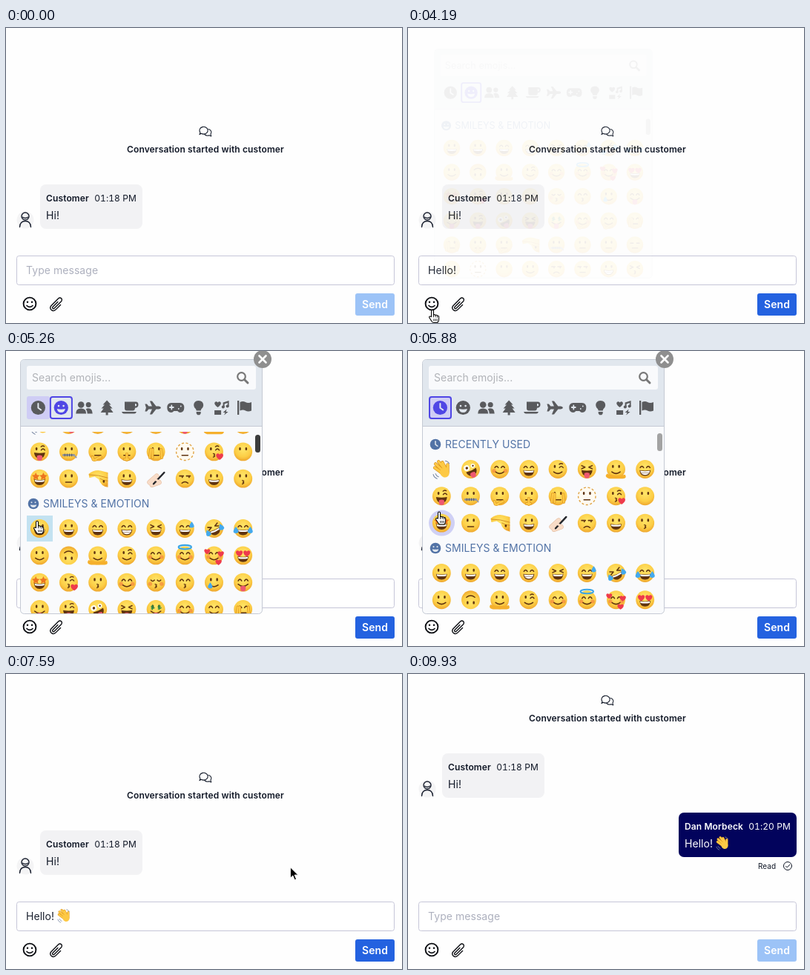
Recreate the animation shown at these times as an HTML page. Size 534 by 398 pixels, loop 9950 ms.

```html
<!DOCTYPE html>
<html lang="en">
<head>
<meta charset="utf-8">
<title>Chat with emoji picker</title>
<style>
html, body { margin: 0; width: 100%; height: 100%; overflow: hidden; background: #fefefe; }
#stage { display: block; width: 534px; height: 398px; font: 14px Inter, sans-serif; letter-spacing: .05px; }
.bold { font-weight: 600; letter-spacing: .12px; }
.small { font-size: 12px; }
.time { font-size: 12px; font-variant-numeric: tabular-nums; letter-spacing: .1px; }
.line { fill: none; stroke-linecap: round; stroke-linejoin: round; }
</style>
</head>
<body>
<svg id="stage" viewBox="0 0 534 398">
  <defs>
    <radialGradient id="skin" cx=".5" cy=".36" r=".66">
      <stop offset="0" stop-color="#ffe66a"/>
      <stop offset=".65" stop-color="#fccd45"/>
      <stop offset="1" stop-color="#eda32c"/>
    </radialGradient>
  </defs>

  <g id="chat" fill="#111827">
    <g class="line" stroke="#111827" stroke-width="1.1">
      <path d="M263 142.2q-1.4 1.5-2 1.5 .9-1.2 .8-2.9a5.6 4.9 0 1 1 4.6 2.3q-1.8 0-3.4-.9z"/>
      <path d="M273 136.500a4.800 4.300 0 0 1 3 6.700q.1 1.700 .8 2.700-1.500-.2-2.500-1.100a5.500 4.500 0 0 1-6.500-1.300"/>
    </g>
    <text class="bold small" x="269" y="168" text-anchor="middle">Conversation started with customer</text>
    <circle cx="26" cy="259" r="11.500" fill="#f4f4f5"/>
    <g class="line" stroke="#1b2130" stroke-width="1.400">
      <circle cx="26" cy="254" r="5"/>
      <path d="M22.500 255.200q3.500 2.600 7 0M18.500 268.500q.5-8 7.500-8t7.500 8"/>
    </g>
    <rect x="46" y="211" width="138" height="60" rx="8" fill="#f2f2f4"/>
    <text class="bold small" x="54" y="234">Customer</text>
    <text class="time" x="176" y="234" text-anchor="end">01:18 PM</text>
    <text x="54" y="258">Hi!</text>
    <g id="reply" fill="#fff">
      <rect x="365" y="291" width="159" height="60" rx="7" fill="#02035c"/>
      <text class="bold small" x="373" y="314">Dan Morbeck</text>
      <text class="time" x="516" y="314" text-anchor="end">01:20 PM</text>
      <text x="373" y="338">Hello!</text>
      <g id="replyWave" transform="translate(424 332) scale(.74)"></g>
    </g>
    <g id="read">
      <text x="472" y="367" font-size="10">Read</text>
      <g class="line" stroke="#111827">
        <circle cx="512" cy="363" r="5.500"/><path d="M509.500 363.200l1.800 1.800 3.400-3.700"/>
      </g>
    </g>
  </g>

  <rect id="ring" x="11" y="304" width="516" height="46" rx="6" fill="#4a8fe4"/>
  <rect id="field" x="14.500" y="307.500" width="509" height="39" rx="3" fill="#fff" stroke="#c6c6d8"/>
  <text id="hint" x="27" y="332" fill="#adb0be">Type message</text>
  <text id="typed" x="27" y="332" fill="#1c2230"></text>
  <g id="typedWave" transform="translate(78 326) scale(.74)"></g>
  <rect id="caret" y="318" width="1" height="18" fill="#000"/>

  <g class="line" stroke="#0b0d12">
    <circle cx="32" cy="372" r="8.400" stroke-width="1.900"/>
    <path d="M29 369.700v.1M35 369.700v.1" stroke-width="2.500"/>
    <path d="M28 374.500q4 3.800 8 0" stroke-width="1.700"/>
    <path transform="translate(57 362) scale(.9)" stroke-width="1.500" d="M18.400 12.700l-7.700 7.700a4.500 4.500 0 0 1-6.400-6.300l11-11a3 3 0 1 1 4.200 4.300L8.600 18.300a1.500 1.500 0 0 1-2.100-2.100l7.800-7.800"/>
  </g>
  <rect id="send" x="471" y="358" width="53" height="30" rx="3"/>
  <text class="bold" x="497.500" y="378" text-anchor="middle" fill="#fff">Send</text>

  <g id="picker">
    <rect x="19.500" y="11.500" width="326" height="343" rx="5" fill="#f9fafc" stroke="#c5cad4"/>
    <path d="M20 101V16q0-4 4-4H341q4 0 4 4V101z" fill="#e1e7ee"/>
    <path d="M20 101.500H345" stroke="#c5cad4"/>
    <rect x="28" y="20" width="309" height="32" rx="3" fill="#f9fafc"/>
    <text x="35" y="41" fill="#b1b3b8">Search emojis...</text>
    <g class="line" stroke="#777"><circle cx="317.500" cy="34.500" r="5.300" stroke-width="2.200"/><path d="M321.700 38.700l4.300 4.300" stroke-width="3"/></g>
    <g id="tabs"></g>
    <svg x="20" y="109" width="325" height="245" viewBox="20 109 325 245">
      <g id="list"><rect id="hover" width="35" height="35"/></g>
      <rect id="thumb" x="336" width="7" height="24" rx="3.500"/>
    </svg>
  </g>
  <g id="close">
    <circle cx="346" cy="11" r="12" fill="#8f8f8f"/>
    <path class="line" d="M341.500 6.500l9 9M350.500 6.500l-9 9" stroke="#fff" stroke-width="2.600"/>
  </g>
  <g id="pointer"></g>
</svg>

<script>
const LOOP = 9950, TICK = 89.46;
const BROWN = '#5f3310', HEADER = '#e1e7ee', ACCENT = '#4f46e5';
const $ = id => document.getElementById(id);
const set = (el, attrs) => { for (const k in attrs) el.setAttribute(k, attrs[k]); };
const show = (el, on) => el.setAttribute('visibility', on ? 'visible' : 'hidden');
const line = (d, w = 1.5, c = BROWN) => `<path class="line" d="${d}" stroke="${c}" stroke-width="${w}"/>`;
const fill = (d, c) => `<path d="${d}" fill="${c}"/>`;
const dot = (x, y, r, c) => `<circle cx="${x}" cy="${y}" r="${r}" fill="${c}"/>`;
const at = (x, y, body, s = 1) => `<g transform="translate(${x} ${y}) scale(${s})">${body}</g>`;

// Emoji: first letter eyes, second letter mouth, the rest extras
const HEART = 'M0 4C-8-1-3-6 0-2.500 3-6 8-1 0 4z';
const STAR = 'M0-4.800l1.400 3 3.300.4-2.400 2.300.6 3.200L0 2.500l-2.900 1.600.6-3.200-2.400-2.300 3.300-.4z';
const heart = (x, y, s) => at(x, y, fill(HEART, '#ee3b4c'), s);
const star = x => at(x, -2.8, fill(STAR, '#ec7420'), 1.1);
const drop = (x, y, s = 1) => at(x, y, fill('M0-4q6 7.500 0 8-6-.5 0-8z', '#43a9ee'), s);
const open = fill('M-7.300 1.200q7.300 1.600 14.600 0-.6 7.600-7.300 7.600t-7.300-7.600z', BROWN);
const teeth = fill('M-6.500 1.800q6.500 1.300 13 0l-.5 2.200q-6 1-12 0z', '#fff');
const tongue = fill('M-3.500 5.500q3.500-2 7 0v3q0 3.500-3.500 3.500t-3.500-3.500z', '#ee5870');
const hand = (d, w) => line(d, w + 1.2, '#d9901c') + line(d, w, '#fdc945');

const EYES = {
  o: line('M-4.100-4.500v1.600M4.100-4.500v1.600', 2.4),
  '^': line('M-6.500-2q2.300-4 4.600 0M1.900-2q2.300-4 4.600 0'),
  u: line('M-6.500-3q2.300 3 4.600 0M1.900-3q2.300 3 4.600 0'),
  x: line('M-7-4.800l4.500 2.100-4.500 2.100M7-4.800l-4.500 2.100 4.500 2.100'),
  w: line('M-4.100-4.500v1.600', 2.4) + line('M2-2q2.500-3.500 5 0M1.800-6.500q2.500-2 4.500-.5', 1.3),
  '-': line('M-6.500-2.500h4M2.500-2.500h4'),
  z: dot(-4.3, -3.5, 3.8, '#fff') + dot(-4, -3.5, 1.7, BROWN) + dot(4.6, -3, 2.7, '#fff') + dot(4.6, -3, 1.2, BROWN),
  r: line('M-7-3.500h5M2-3.500h5M-3.500-2v.3M5.500-2v.3', 1.7),
  s: star(-5) + star(5),
  h: heart(-5, -2.5, 1.05) + heart(5, -2.5, 1.05)
};
const MOUTHS = {
  s: line('M-5.500 3.500q5.500 4.500 11 0'),
  O: open + teeth,
  g: open + fill('M-6.300 2q6.300 1.400 12.600 0-.6 5.600-6.300 5.600t-6.300-5.600z', '#fff') + line('M-5.500 4.900h11', .5),
  f: line('M-4 4.800h8'),
  k: line('M-1 2.500q3.500.5 .8 2.300 2.700.8-.8 2.400', 1.3),
  t: open + tongue,
  l: line('M-6.500 2.500q6.500 5.500 13 0') + tongue,
  n: line('M-4 6q4-3.500 8 0'),
  z: line('M-7 4.500h14', 2.6, '#8b8f99') + line('M-5 3v3M-2 3v3M1 3v3M4 3v3', .8, '#555') + line('M7 4.500l3 3', 1.8, '#9a9da6'),
  _: ''
};
const EXTRAS = {
  b: '<g opacity=".45">' + dot(-7.5, 2, 2.6, '#f0603a') + dot(7.5, 2, 2.6, '#f0603a') + '</g>',
  a: '<ellipse cy="-11" rx="8.500" ry="2.700" fill="none" stroke="#3aa5e6" stroke-width="2"/>',
  c: drop(-5, 4),
  d: drop(9, -5),
  j: drop(-9.5, 2, 1.1) + drop(9.5, 2, 1.1),
  r: heart(7.5, 6.5, 1.1),
  R: heart(-9, -5, .9) + heart(9, -2, .95) + heart(6, 9, .95),
  h: hand('M-7 7l1 3.500q3 1.500 5-1.500l5-2', 2.6),
  q: hand('M0 3v8M-3 10h5', 2.6),
  p: hand('M-8 8l1-11M-4.500 8v-11M8 8l-1-11', 2.4),
  m: fill('M-12 6q4 2 12 2t12-1q3 5-3 5.500h-18q-7-2-3-6.500z', '#f5b02c'),
  M: line('M-4.500-5.500v6M4.500-5.500v6', 1, '#2c8a45') + line('M-3-4q-3-1-3 .8t3 1.300-3 1.600M6-4q-3-1-3 .8t3 1.300-3 1.600', 1.2, '#2c8a45')
};
const WHOLE = {
  wave: hand('M2 6L-9-2M3 3L-8-7M5 1L-4-10M6 1L1-9M8 4L8-6', 3.1) +
    '<ellipse cx="4" cy="4.500" rx="6" ry="6.500" transform="rotate(-35 4 4.500)" fill="#fdc945"/>' +
    line('M-8 6q1 3 4 4M-11 7q1 4 5 5.500M5-11q3.500.5 5 3.500', 1.1, '#7c8aa5'),
  write: line('M-8 5L1-3M-5 8l9-3', 7, '#e6bfa3') + line('M-8 5L1-3M-5 8l9-3', 5.800, '#f8dcc8') +
    line('M-3 7L11-8', 2.4, '#24262b') + line('M-2 1l5 2', 3, '#f8dcc8'),
  salute: fill('M-12-6Q-5-12 4-10.500L13.500-8V11.500Q4 10 1.500 1L-4-2.500-11-1z', 'url(#skin)') +
    line('M-11-5L1-4 13-1M3 0q4 3 10 3', .9, '#d08a24') + line('M8 3v1.200', 2.4)
};

function emoji(code) {
  if (WHOLE[code]) return WHOLE[code];
  const extra = code.slice(2), has = c => extra.includes(c);
  const base = has('D')
    ? '<circle r="11.500" fill="#fffaf0" stroke="#e0a548" stroke-width="1.400" stroke-dasharray="3 2.500"/>'
    : '<circle r="12.200" fill="url(#skin)"/>';
  const turn = has('v') ? 180 : has('i') ? -25 : 0;
  return `<g transform="rotate(${turn})">${base}${EYES[code[0]]}${MOUTHS[code[1]]}${[...extra].map(c => EXTRAS[c] || '').join('')}</g>`;
}

// Tab icons, centred on 0,0
const ICONS = [
  '<circle r="9.600"/>' + line('M0-5.500V.3l3.800 2.700', 2, HEADER),
  '<circle r="9.600"/>' + line('M-3.300-2.500v.1M3.300-2.500v.1', 2.6, HEADER) + fill('M-5.500 1.500q5.500 1.500 11 0-.6 5-5.500 5t-5.500-5z', HEADER),
  '<circle cx="-4" cy="-4" r="4.300"/><path d="M-11 8q0-7 7-7t7 7z"/><circle cx="6" cy="-4" r="3.500"/><path d="M4 1q7-1.500 7.500 7h-7q0-4-2-6z"/>',
  '<path d="M0-10l5.500 6h-2.500l4.500 5h-3l4 5.500h-7V10h-3V6.500h-7l4-5.500h-3l4.500-5h-2.500z"/>',
  '<path d="M-7-8H8q3.500 0 3.500 4T7 .3Q7 4 4 4H-4q-3 0-3-3zM7-5.500v3.500q2.200 0 2.200-1.800T7-5.500zM-11 5.500H9q-1 2.500-3 2.500H-8q-2 0-3-2.500z" fill-rule="evenodd"/>',
  '<path d="M-10.500-5h2.500l2.500 3H-1L-4-9h3l5.500 7H8q3 .3 3 2T8 2H4.500L-1 9h-3l3-7h-4.500L-8 5h-2.500L-9 0z"/>',
  '<path d="M-6-6.500H6q5.500 0 5.500 6.500T6 6.500q-2 0-3.500-2h-5q-1.500 2-3.500 2-5.500 0-5.500-6.500T-6-6.500z"/>' + line('M-8-.5h5M-5.500-3v5M4 1.500v.1M7-2v.1', 1.8, HEADER),
  '<path d="M0-9.500q6.500.3 6.500 6.300 0 2.200-2.500 4.800-.8 1-1 2.400h-6q-.2-1.400-1-2.400-2.500-2.600-2.500-4.800 0-6 6.500-6.300zM-3 5.500h6v2.200L1.500 9.800h-3L-3 7.700z"/>',
  at(-5, -4.5, `<path d="${HEART}"/>`) + '<path d="M2-7l8-2.500v8h-1.800v-5L4-5v4.500H2z"/><circle cx="2.200" cy="-1" r="2"/><circle cx="8" cy="-2" r="2"/><path d="M-9.500 3.500h9v6h-9zM7 2L2 6.500h3L3.500 10 9 5.500H6z"/>',
  '<path d="M-9.500-9.500h2.300v19h-2.300zM-6-7.500q4-2 7.500 0t8 0V4q-4.500 2-8 0T-6 4z"/>'
];
const tab = i => 43.4 + 30.9 * i;
$('tabs').innerHTML = '<rect id="glow" x="28" y="61" width="31" height="31" rx="3" fill="#cfcdf5"/>' +
  ICONS.map((body, i) => `<g class="tab" transform="translate(${tab(i)} 76.500)">${body}</g>`).join('') +
  `<rect id="mark" y="62" width="29" height="29" rx="3" fill="none" stroke="${ACCENT}" stroke-width="2"/>`;
const tabs = [...document.querySelectorAll('.tab')];

const SECTIONS = [
  [126, 'RECENTLY USED', 0, `wave zti ^sb ^O ws xt osm ^g
    wt oz ofh ofq ofp ofD wkr o_
    sO of salute oO write rn oO ok`],
  [266, 'SMILEYS & EMOTION', 1, `oO oO ^O ^g xO ^Od xOij ^Oj
    os osv osm ws ^sb ^sba ^sbR hO
    sO wkr ok ^sb ukb ^k osc ^l
    ol wt zti xt olM ^sbh ^sh ^fp
    ofp ofq ofh salute oz of of -f
    o_ ofD o_ os rn rf og xk`]
];
const rowYs = [];
for (const [y, title, icon, codes] of SECTIONS) {
  let out = `<g fill="#5273a6">${at(37, y, ICONS[icon], .76)}<text x="50" y="${y + 5}">${title.replace('&', '&amp;')}</text></g>`;
  codes.split('\n').forEach((row, r) => {
    const cy = y + 33.5 + 36.3 * r;
    rowYs.push(cy);
    row.trim().split(' ').forEach((code, c) => out += at(45.3 + 39.2 * c, cy, emoji(code), 1.02));
  });
  $('list').insertAdjacentHTML('beforeend', out);
}
$('replyWave').innerHTML = $('typedWave').innerHTML = WHOLE.wave;

const ARROW = '<path d="M0 0V14.500L3.400 11.300 5.800 17 8.200 16 5.800 10.400H10.500z" fill="#000" stroke="#fff"/>';
const HAND = '<path d="M-1.600 9V1a1.600 1.600 0 0 1 3.200 0V6.500q2.400-1.200 2.800.4 2.200-.8 2.600.8 2.200-.4 2.200 1.600V12q0 4.500-2.400 5.500H1.500q-2 0-3-2.500L-4.500 10.500q-.6-2.200 1.200-2z" fill="#fff" stroke="#000" stroke-width="1.100"/>' +
  line('M1.600 6.500v3M4.400 7v2.500M7 8v2M2 12.500v2.500M4.300 12.500v2.500M6.600 12.500v2.500', .9, '#000');
const POINTERS = {
  arrow: ARROW,
  hand: at(0, 0, HAND, .94),
  beam: line('M-3-8q3 0 3 2V6q0 2-3 2M3-8q-3 0-3 2M3 8q-3 0-3-2M-2 1h4', 1.2, '#000'),
  no: '<g fill="#fff" stroke="#aaa" stroke-width="2"><circle cx="8" cy="21" r="7.500"/><path d="M3 16l10 10"/></g>' + ARROW
};

// Time tables: [ms, value...]
const PATH = [[720, 252, 372], [1070, 233, 325], [3130, 233, 325], [4000, 33, 381], [4560, 33, 381],
  [5000, 42, 230], [5650, 42, 230], [6240, 42, 165], [6900, 42, 165],
  [7690, 395, 264], [8260, 505, 371], [9500, 505, 371], [9660, 512, 398]];
const SCROLL = [[5000, 140], [5278, 60], [5550, 0]];
const FADE = [[4110, 0], [4205, .08], [4295, .6], [4384, 1], [6890, 1], [7070, 0]];
const ZOOM = [[4205, .9], [4384, 1], [6890, 1], [7070, .9]];
const TYPING = [[0, ''], [1700, 'H'], [1970, 'He'], [2150, 'Hel'], [2240, 'Hell'], [2330, 'Hello'], [2680, 'Hello!'], [8400, '']];
const CARET = [[980, 2860], [3400, 3930], [8310, 9030], [9570, 9930]];
const FOCUS = [[980, 3930], [8310, 9930]];

const smooth = p => p * p * (3 - 2 * p);
const within = (spans, t) => spans.some(([a, b]) => t >= a && t < b);
const latest = (steps, t) => steps.filter(s => t >= s[0]).pop()[1];
function track(keys, t, ease = p => p) {
  const n = keys.findIndex(k => k[0] > t);
  if (n === 0) return keys[0].slice(1);
  if (n < 0) return keys[keys.length - 1].slice(1);
  const a = keys[n - 1], b = keys[n], p = ease((t - a[0]) / (b[0] - a[0]));
  return a.slice(1).map((v, i) => v + (b[i + 1] - v) * p);
}

function pointerKind(x, y, t, isOpen) {
  if (isOpen && x < 358 && y < 355) return 'hand';
  if (x > 14 && x < 524 && y > 307 && y < 347) return 'beam';
  if (y > 358 && x < 44) return 'hand';
  if (y > 358 && x > 471) return t >= 8400 ? 'no' : 'hand';
  return 'arrow';
}

let lastKind = '';
function draw(t) {
  const q = Math.floor((t + 20) / TICK) * TICK;
  const [x, y] = track(PATH, q, smooth), [scroll] = track(SCROLL, q);
  const [alpha] = track(FADE, q), [zoom] = track(ZOOM, q);
  const isOpen = alpha > .5, text = latest(TYPING, t), focused = within(FOCUS, t);
  const pointing = t >= 720 && t < 9660, picked = t >= 6690;

  set($('chat'), { transform: `translate(0 ${t >= 8850 ? -104 : t >= 8580 ? -80 : 0})` });
  show($('reply'), t >= 8580);
  show($('read'), t >= 8850);

  show($('ring'), focused);
  set($('field'), { stroke: focused ? '#fff' : '#c6c6d8' });
  show($('hint'), !text);
  $('typed').textContent = text;
  show($('typedWave'), picked && text);
  show($('caret'), within(CARET, t));
  const tail = picked && text ? 61 : text ? $('typed').getComputedTextLength() : 0;
  set($('caret'), { x: Math.round(27 + tail) });

  const over = pointing && x > 471 && y > 358;
  const color = text ? (over ? '#02035c' : '#2462e0') : over ? '#9a9bc0' : '#9cc3f7';
  set($('send'), { fill: color });

  show($('picker'), alpha > 0);
  set($('picker'), { opacity: alpha, transform: `translate(182.500 183) scale(${zoom}) translate(-182.500 -183)` });
  show($('close'), isOpen && !picked);
  set($('list'), { transform: `translate(0 ${-scroll})` });
  set($('thumb'), { y: 111 + scroll * .035, fill: q > 5000 && q < 5640 ? '#3c3c3c' : '#a3a3a3' });
  const active = t >= 5300 ? 0 : 1;
  show($('glow'), alpha > 0 && t >= 5080);
  set($('mark'), { x: tab(active) - 14.4 });
  tabs.forEach((el, i) => set(el, { fill: i === active ? ACCENT : '#595a5d' }));

  const row = rowYs.find(cy => Math.abs(cy - y - scroll) < 18.1), col = Math.round((x - 45.3) / 39.2);
  const hovering = isOpen && row && y > 102 && y < 354 && col < 8;
  show($('hover'), hovering);
  if (hovering) set($('hover'), {
    x: 28 + 39.2 * col, y: row - 17.5,
    rx: scroll > 0 ? 0 : 17.5, fill: scroll > 0 ? '#c3e2f1' : '#cfd0f5'
  });

  show($('pointer'), pointing);
  const kind = pointerKind(x, y, t, isOpen);
  if (kind !== lastKind) $('pointer').innerHTML = POINTERS[lastKind = kind];
  set($('pointer'), { transform: `translate(${x} ${y})` });
}

const start = performance.now();
function loop() {
  draw((performance.now() - start) % LOOP);
  requestAnimationFrame(loop);
}
loop();
</script>
</body>
</html>
```
